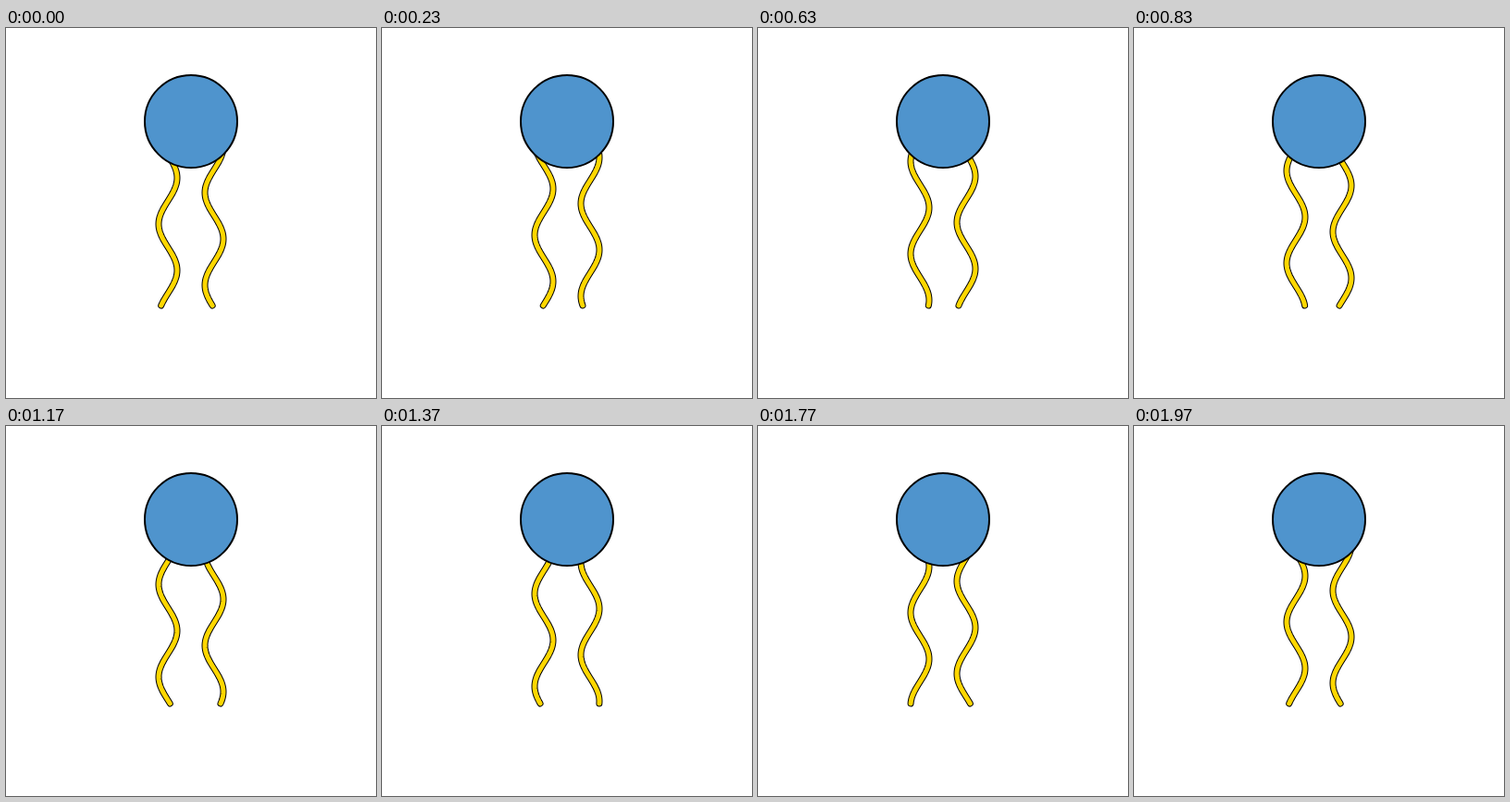
Animation, 400 px wide and 400 px high, one loop 2010 ms. Source, as an HTML page:

```html
<!DOCTYPE html>
<html lang="en">
<head>
<meta charset="utf-8">
<title>Jellyfish</title>
<style>
  html, body { margin: 0; width: 100%; height: 100%; overflow: hidden; background: #fff; }
  svg { display: block; width: 100vw; height: 100vh; }
  path { fill: none; stroke-linecap: round; stroke-linejoin: round; }
  .edge { stroke: #000; stroke-width: 7; }
  .core { stroke: #ffd700; stroke-width: 5; }
  circle { fill: #4f94cd; stroke: #000; stroke-width: 2; }
</style>
</head>
<body>
<svg viewBox="0 0 400 400">
  <g id="left"><path class="edge"/><path class="core"/></g>
  <g id="right"><path class="edge"/><path class="core"/></g>
  <circle cx="200" cy="101" r="50"/>
</svg>
<script>
  const LOOP = 2010, STEPS = 59, STEP_MS = 100 / 3;
  const TOP = 110, BOTTOM = 300, WAVE = 100, SWING = 10;

  // x is the centre line, crest the height of a rightmost point at the start
  const strands = [
    { id: 'left', x: 175, crest: 162 },
    { id: 'right', x: 225, crest: 228 }
  ].map(s => ({ ...s, paths: document.querySelectorAll(`#${s.id} path`) }));

  function strandPath(x, crest) {
    const points = [];
    for (let y = TOP; y <= BOTTOM; y += 2) {
      const dx = SWING * Math.cos((y - crest) / WAVE * 2 * Math.PI);
      points.push(`${(x + dx).toFixed(2)},${y}`);
    }
    return 'M' + points.join('L');
  }

  // Steps run at 30 per second, on a 10 ms grid
  function stepAt(ms) {
    const tick = Math.floor(ms / 10) * 10;
    return Math.min(STEPS, Math.floor((tick + 5) / STEP_MS));
  }

  function draw(ms) {
    const shift = WAVE * stepAt(ms) / STEPS;
    for (const { x, crest, paths } of strands) {
      const d = strandPath(x, crest + shift);
      paths.forEach(p => p.setAttribute('d', d));
    }
  }

  const start = performance.now();
  function tick() {
    draw((performance.now() - start) % LOOP);
    requestAnimationFrame(tick);
  }
  tick();
</script>
</body>
</html>
```
